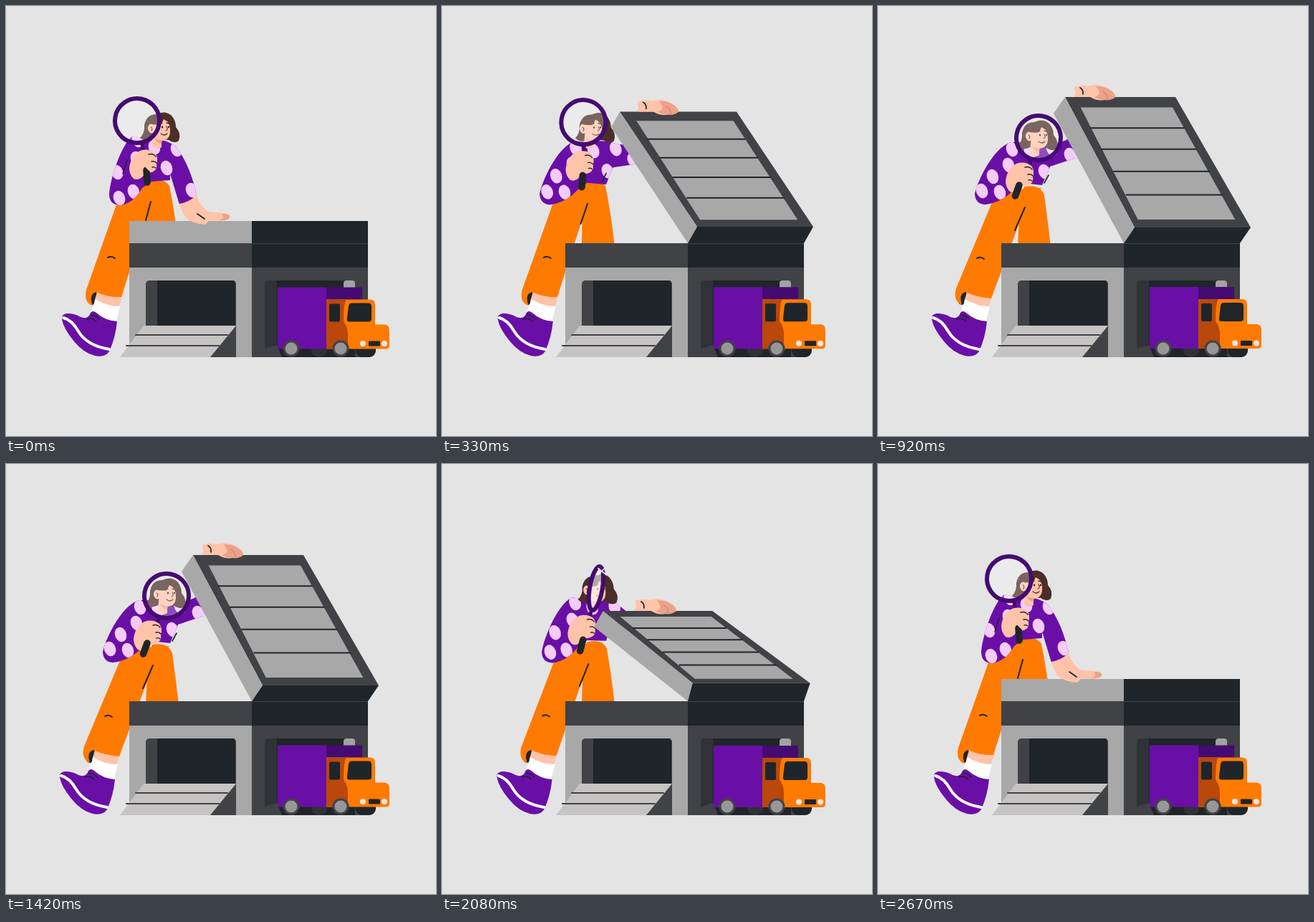
An HTML page with a canvas that plays this animation: 600 by 600 pixels, repeating every 2760 ms.

```html
<!DOCTYPE html>
<html lang="en">
<head>
<meta charset="utf-8">
<title>Looking inside the warehouse</title>
<style>
  html, body { margin: 0; width: 100%; height: 100%; overflow: hidden; background: #e4e4e4; }
  canvas { display: block; }
</style>
</head>
<body>
<canvas id="stage" width="600" height="600"></canvas>
<script>
const ctx = document.getElementById('stage').getContext('2d');
const LOOP = 2760, STEP = 1000 / 12;
const PURPLE = '#6a0fa6', PLUM = '#450b72', PINK = '#f4ccfb', ORANGE = '#ff7a00', SKIN = '#ffc3a9',
      BLUSH = '#eba289', HAIR = '#4b2e27', INK = '#20252a', SLATE = '#414246', SILVER = '#a8a8a8';

const lerp = (a, b, k) => a + (b - a) * k;
const ease = u => u < .5 ? 4 * u ** 3 : 1 - 4 * (1 - u) ** 3;
const ramp = (t, from, to) => Math.min(1, Math.max(0, (t - from) / (to - from)));
const between = (t, a, b, c, d) => ease(ramp(t, a, b)) - ease(ramp(t, c, d));

// Blend two path strings that share the same commands.
function morph(a, b, k) {
  const ends = b.match(/-?[\d.]+/g);
  let i = 0;
  return a.replace(/-?[\d.]+/g, n => lerp(+n, +ends[i++], k));
}
function fill(path, color) {
  ctx.fillStyle = color;
  ctx.fill(new Path2D(path));
}
function line(path, color = INK, width = 2) {
  ctx.strokeStyle = color;
  ctx.lineWidth = width;
  ctx.lineCap = ctx.lineJoin = 'round';
  ctx.stroke(new Path2D(path));
}
function box(x, y, w, h, color, radius = 0) {
  ctx.fillStyle = color;
  ctx.beginPath();
  ctx.roundRect(x, y, w, h, radius);
  ctx.fill();
}
function oval(x, y, rx, ry, color, turn = 0) {
  ctx.fillStyle = color;
  ctx.beginPath();
  ctx.ellipse(x, y, rx, ry, turn, 0, 7);
  ctx.fill();
}
const poly = (points, color) => fill('M' + points.map(p => p.join(' ')).join('L') + 'Z', color);
function shifted(x, y, draw) {
  ctx.save();
  ctx.translate(x, y);
  draw();
  ctx.restore();
}

// Corner positions of the lid at a few degrees of opening.
const OPENING = [0, .56, .87, 1];
const LID = {
  backLeft:   [[172, 300], [227, 201], [248, 147.5], [261, 127]],
  backRight:  [[334, 300], [379, 201], [411, 147.5], [415, 127]],
  frontLeft:  [[343, 300], [350, 306], [356, 308], [358, 309]],
  frontRight: [[505, 300], [514, 306], [518, 308], [520, 309]],
  under:      [[172, 331], [214, 223], [236, 169], [245, 150]]
};
function lidCorners(open) {
  let i = 0;
  while (i < 2 && open > OPENING[i + 1]) i++;
  const k = ramp(open, OPENING[i], OPENING[i + 1]), corners = {};
  for (const name in LID)
    corners[name] = LID[name][i].map((v, axis) => lerp(v, LID[name][i + 1][axis], k));
  return corners;
}

function drawLid(lid) {
  const { backLeft, backRight, frontLeft, frontRight, under } = lid;
  const at = (u, v) => [0, 1].map(i =>
    lerp(lerp(backLeft[i], backRight[i], u), lerp(frontLeft[i], frontRight[i], u), v));
  if (backLeft[1] < 299) {
    poly([backLeft, backRight, frontRight, frontLeft], SLATE);
    poly([at(.09, .08), at(.92, .08), at(.905, .94), at(.065, .94)], SILVER);
    for (const v of [.238, .4, .57, .75])
      line('M' + at(.08, v) + 'L' + at(.915, v), INK, 2);
  }
  poly([backLeft, frontLeft, [343, 331], under], SILVER);
  poly([frontLeft, frontRight, [505, 331], [343, 331]], INK);
}

function drawHouse() {
  box(172, 331, 171, 35, SLATE);
  box(343, 331, 162, 35, INK);
  line('M344 331.5H504', '#3d4247', 1.5);
  box(172, 365, 171, 125, SILVER);
  box(343, 365, 162, 125, SLATE, [0, 0, 4, 0]);
  box(195, 383, 126, 66, SLATE, [5, 5, 0, 0]);
  box(211, 383, 109, 63, INK, [0, 4, 0, 0]);
  fill('M321 446V490H284Z', SLATE);
  fill('M192 446H321L285 490H159Z', '#c6c4c3');
  line('M181 459H309M168 474H297', SLATE, 2);
  box(361, 383, 126, 107, '#2f3236', [5, 5, 0, 0]);
  box(378, 383, 109, 107, INK, [0, 5, 0, 0]);
  fill('M378 473L385 490H361V478Z', SLATE);
  box(471, 383, 16, 25, '#a3a3a3', [4, 4, 0, 0]);
}

function drawTruck(bob) {
  oval(437, 480, 11, 10, '#303236');
  box(488, 468, 28, 22, INK, 9);
  shifted(0, bob, () => {
    box(379, 392, 69, 86, PURPLE);
    box(447, 392, 50, 20, PLUM);
    fill('M447 409H508Q515 409 515 416V444H529Q535 445 535 452V473Q535 478 530 478H447Z', ORANGE);
    fill('M447 409H475Q471 414 471 440Q477 447 477 458V478H447Z', '#b9480a');
    box(451, 415, 15, 25, INK, 2);
    fill('M482 414H506Q510 414 510 419V436Q510 440 506 440H479Q475 440 476 435L478 418Q479 414 482 414Z', INK);
    box(506, 467, 16, 7, INK, 1);
    oval(498, 470.5, 4, 4, '#eee6e2');
    oval(528, 470.5, 4, 4, '#eee6e2');
  });
  for (const x of [398, 467]) {
    oval(x, 478, 11.5, 11.5, SLATE);
    oval(x, 478, 8.5, 8.5, '#979797');
  }
}

function drawLegs(look, lean) {
  fill(morph('M196 266L195 336L241 336Q236 290 228 251Q219 238 200 246Z',
             'M198 270L195 336L241 336Q237 300 232 264Q226 248 204 252Z', lean), ORANGE);
  shifted(-3 * lean, 0, () => {
    oval(121, 407, 7, 10, INK, .2);
    fill('M128 396L123 413Q140 423 157 421L164 400Z', SKIN);
    fill('M125 409L118 428Q135 443 153 443L159 419Q140 419 125 409Z', '#fff');
    fill('M78 437Q77 430 85 429Q96 429 104 434Q115 438 118 428Q121 424 126 428Q138 439 155 440Q153 462 144 482Q138 491 124 488Q108 484 95 468Q80 450 78 437Z', PURPLE);
    line('M80 435Q92 438 101 454Q113 474 144 479', '#fff', 4);
    line('M113 437Q120 434 126 440M119 431Q126 432 130 437', INK, 1.6);
  });
  fill(morph('M158 266L112 396Q108 414 121 418Q115 402 126 399Q142 407 161 406L204 271L222 245L190 250Z',
             'M160 272L109 394Q104 411 117 417Q112 402 122 399Q140 407 158 408L206 279L228 254L192 256Z', lean), ORANGE);
  line(morph('M202 273L195 299', 'M205 281L191 313', look), INK, 2);
  line(morph('M142 351Q147 348 152 352', 'M138 352Q143 349 148 353', lean), INK, 2);
}

const DOTS = [
  [184, 187, 187, 200], [155, 232, 160, 238], [158, 268, 145, 258], [178, 259, 170, 260], [182, 213, 182, 222],
  [224, 226, 232, 231], [238, 200, 243, 199], [259, 257, 268, 208], [207, 197, 212, 203]
];

function drawSweater(open) {
  const shape = morph(
    'M176 182C160 195 146 240 144 262Q144 278 160 278Q178 275 190 254L203 245L229 243L229 234L242 277Q258 274 266 264Q258 225 238 197Q222 184 205 188Z',
    'M186 190C165 195 142 235 135 262Q136 277 150 277Q172 274 188 258L202 247L229 250L240 224L276 212Q277 200 272 180Q262 190 246 192Q225 186 205 190Z', open);
  fill(shape, PURPLE);
  ctx.save();
  ctx.clip(new Path2D(shape));
  for (const [x0, y0, x1, y1] of DOTS)
    oval(lerp(x0, x1, open), lerp(y0, y1, open), 8, 10.5, PINK, -.35);
  ctx.restore();
  line(morph('M169 215L163 234', 'M238 236L232 247', open), INK, 1.6);
}

function drawHead(look, lean) {
  const turn = -7 * Math.sin(Math.PI * look);
  shifted(8 * lean, 11 * lean, () => {
    shifted(turn / 4, 0, () =>
      fill('M187 184Q194 177 193 166Q196 151 210 151Q222 145 231 153Q237 160 237 169Q245 178 241 188Q235 193 227 187L206 185Q196 192 187 184Z', HAIR));
    shifted(turn, 0, () => {
      fill('M206 165Q217 168 220 158Q230 162 229 175Q229 187 217 188L217 197Q210 202 204 195L205 180Z', SKIN);
      oval(203, 171, 5, 6.5, SKIN, -.2);
      fill('M207 184Q212 188 218 187L217 192Q210 191 207 184Z', BLUSH);
      line('M202 169Q205 170 203 174M224 168Q227 173 223 174M216 178Q221 182 225 178', HAIR, 1.2);
      line('M214 165L218 163M224 163L227 164', HAIR, 1.5);
      oval(218, 169, 1.2, 1.5, INK);
      oval(227, 169, 1.1, 1.4, INK);
    });
  });
}

function drawMagnifier(look, dip, spin) {
  const x = lerp(183, 224, look), y = lerp(160, 184, dip);
  const width = Math.max(.04, Math.abs(Math.cos(Math.PI * spin)));
  line(`M${lerp(190, 213, look)} ${lerp(193, 216, dip)}L${lerp(196, 203, look)} ${lerp(226, 240, dip)}`, PLUM, 5);
  ctx.beginPath();
  ctx.ellipse(x, y, 31 * width, 31, .17, 0, 7);
  ctx.fillStyle = `rgba(255,255,255,${lerp(.72, .26, width)})`;
  ctx.fill();
  ctx.strokeStyle = PLUM;
  ctx.lineWidth = 6;
  ctx.stroke();
  if (width < .7)
    shifted(x + 8, y - 24, () => line('M-5 -4L5 4M-5 5L5 -5', '#fff', 1.6));

  shifted(6 * dip, 18 * dip, () => {
    fill('M172 226Q174 209 187 202Q199 198 208 205Q213 212 210 220Q212 229 203 232L194 234Q186 245 178 241Q172 235 172 226Z', SKIN);
  });
  line(`M${lerp(196, 197, look)} ${lerp(229, 250, look)}L${lerp(197, 191.5, look)} ${lerp(246, 265, look)}`, INK, 9.5);
  shifted(6 * dip, 18 * dip, () => {
    fill('M192 222Q192 212 201 210Q212 211 210 221Q211 230 202 232Q197 228 192 222Z', SKIN);
    line('M199 207Q205 205 209 210M203 217Q208 216 210 219M204 225Q207 224 209 226', INK, 1.4);
  });
}

function drawHand(open, lid) {
  const top = lid.backLeft[1];
  if (open < .12) {
    shifted(0, top - 300, () => {
      fill('M241 276Q256 274 265 264Q272 280 282 287L303 289Q314 290 312 296Q304 301 284 299L278 305Q260 304 250 295Z', SKIN);
      fill('M301 290Q314 289 312 296Q306 300 297 299Q307 296 301 290Z', BLUSH);
      line('M267 290L277 297', INK, 1.8);
    });
  } else {
    shifted(9 * (open - 1), top - 127, () => {
      fill('M274 113Q284 109 292 112L304 110Q316 111 322 116Q331 121 331 127Q326 132 316 131Q306 133 296 127L276 127Z', SKIN);
      fill('M304 112Q316 112 322 116Q331 121 331 127Q326 132 316 131Q308 131 302 127Q314 124 304 112Z', BLUSH);
      line('M313 119Q320 122 320 130', '#d98267', 1.2);
      line('M282 114Q287 117 286 123', INK, 1.7);
    });
  }
}

function draw(t) {
  const open = between(t, 20, 480, 1830, 2350);
  const look = between(t, 0, 750, 1870, 2430);
  const dip = look ** 2.3, lean = look ** 3;
  const lid = lidCorners(open);

  ctx.fillStyle = '#e4e4e4';
  ctx.fillRect(0, 0, 600, 600);

  drawLegs(look, lean);
  if (open >= .12)
    line(`M${lerp(254, 274, open)} ${lerp(268, 197, open)}L${lerp(272, 282, open)} ${lid.backLeft[1]}`, SKIN, 16);
  drawSweater(open);
  drawHead(look, lean);
  drawMagnifier(look, dip, ramp(t, 1830, 2450));
  drawHouse();
  drawLid(lid);
  drawHand(open, lid);
  drawTruck(.5 - .5 * Math.sin(2 * Math.PI * t / LOOP));
}

function tick() {
  const t = performance.now() % LOOP;
  draw(Math.min(32, Math.floor((t + 4) / STEP)) * STEP);
  requestAnimationFrame(tick);
}
tick();
</script>
</body>
</html>
```
